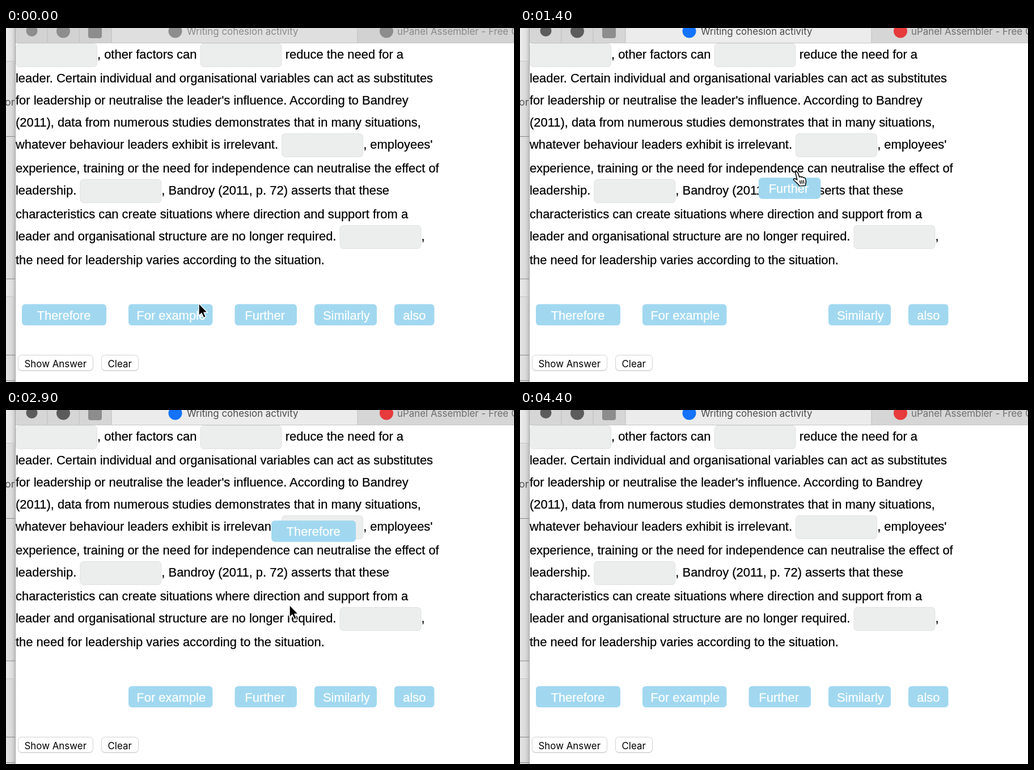
Recreate the animation shown at these times as an HTML page. Size 896 by 625 pixels, loop 5 s.

```html
<!DOCTYPE html>
<html lang="en">
<head>
<meta charset="utf-8">
<title>Writing cohesion activity</title>
<style>
  html, body { margin: 0; width: 100%; height: 100%; overflow: hidden; background: #fff; }
  svg { display: block; width: 896px; height: 625px; }
  text { white-space: pre; }
  .words { font: 21.93px "Liberation Sans", Arial, sans-serif; stroke: #000; stroke-width: .25px; }
  .chip .words { fill: #fff; stroke: #fff; }
  .chip rect { fill: #a1d8f0; }
  .slot { fill: #eceeed; stroke: #e0e2e1; }
  .ui { font: 16.9px Inter, sans-serif; }
  .bar { fill: #d2d2d2; }
  .tab { fill: #dfdfdf; }
  .title, .other { fill: #8a8a8a; }
  .icon { fill: #8d8d8d; }
  .active .bar { fill: #d6d6d6; }
  .active .tab { fill: #ececec; }
  .active .title { fill: #4b4b4b; }
  .active .other { fill: #707070; }
  .active .blue { fill: #1473fa; }
  .active .red { fill: #e63a3c; }
  .active .dark { fill: #5c5c5c; }
</style>
</head>
<body>
<svg viewBox="0 0 896 625" xmlns="http://www.w3.org/2000/svg">
  <defs>
    <linearGradient id="shade">
      <stop offset="0" stop-opacity=".02"/>
      <stop offset=".6" stop-opacity=".07"/>
      <stop offset="1" stop-opacity=".2"/>
    </linearGradient>
  </defs>
  <rect width="896" height="625" fill="#fff"/>

  <g id="page"></g>
  <g id="chips"></g>

  <g id="tabs">
    <rect class="bar" x="17" width="879" height="27"/>
    <rect class="tab" x="186" width="434" height="27"/>
    <path d="M73 0V26M129 0V26M186 0V26M620 0V26" stroke="#bdbdbd"/>
    <path d="M17 26.5H896" stroke="#c6c6c6"/>
    <circle class="icon dark" cx="45.5" cy="5" r="10"/>
    <circle class="icon dark" cx="101" cy="5.5" r="12"/>
    <rect class="icon" x="145" y="-6" width="24" height="24" rx="4"/>
    <circle class="icon blue" cx="298.5" cy="5.5" r="12"/>
    <circle class="icon red" cx="671" cy="5.5" r="12"/>
    <text class="ui title" x="319" y="12">Writing cohesion activity</text>
    <text class="ui other" x="690" y="12">uPanel Assembler - Free Code</text>
  </g>

  <g id="edge">
    <rect width="17" height="625" fill="#e9e9e9"/>
    <rect width="17" height="58" fill="#f2f2f2"/>
    <rect y="443" width="17" height="31" fill="#efefef"/>
    <text class="ui" x="-2" y="137" style="font-size:18px" fill="#5a5a5a">or</text>
    <rect width="17" height="625" fill="url(#shade)"/>
    <path d="M0 58.5H17M0 474.5H17" stroke="#c4c4c4"/>
    <path d="M0 191.5H17M0 443H17M0 577.5H17M0 622.5H17" stroke="#858585"/>
    <path d="M16.5 0V625" stroke="#a5a5a5"/>
  </g>

  <g id="arrow">
    <path d="M0 0V22L5 17.6L8.6 25.6L12.4 24L9 16.2H15.5Z" stroke="#fff" stroke-width="1.4" stroke-linejoin="round"/>
  </g>
  <g id="hand" stroke="#000" stroke-width="1.5" stroke-linecap="round" stroke-linejoin="round">
    <path fill="#fff" d="M5 3C4 .2 8-.3 9 2L12 10C13 8.5 15 8.8 15.5 10.5C16.5 9.2 18.5 9.5 19 11.3C20 10.4 22 11 22.5 13L23.5 17C24 20 22.5 21.5 22.5 25L12 26C11 23 6 20 2 15.5C.5 13.5 3 12 5 13.3L8 15Z"/>
    <path fill="none" d="M12.8 16.5L13.8 21.5M16 16.2L16.8 21.2M19.2 16L19.8 21"/>
  </g>
</svg>

<script>
const LOOP = 5000, STEP = 100, LAST = 4400;
const RETURN = 300, HOME_Y = 487.5;
const $ = id => document.getElementById(id);

function add(parent, tag, attrs, label) {
  const el = document.createElementNS("http://www.w3.org/2000/svg", tag);
  for (const k in attrs) el.setAttribute(k, attrs[k]);
  if (label) el.textContent = label;
  return parent.appendChild(el);
}

// Each underscore is a gap to fill; a line with gaps is a little taller.
const passage = `_, other factors can _ reduce the need for a
leader. Certain individual and organisational variables can act as substitutes
for leadership or neutralise the leader's influence. According to Bandrey
(2011), data from numerous studies demonstrates that in many situations,
whatever behaviour leaders exhibit is irrelevant. _, employees'
experience, training or the need for independence can neutralise the effect of
leadership. _, Bandroy (2011, p. 72) asserts that these
characteristics can create situations where direction and support from a
leader and organisational structure are no longer required. _,
the need for leadership varies according to the situation.`;

const page = $("page"), slots = [];
const pen = document.createElement("canvas").getContext("2d");
pen.font = '21.93px "Liberation Sans", Arial, sans-serif';

let baseline = 53.5;
for (const line of passage.split("\n")) {
  let x = 17;
  line.split("_").forEach((part, i) => {
    if (i) {
      const y = baseline - 26.5;
      slots.push([x, y]);
      add(page, "rect", { class: "slot", x: x + .5, y: y + .5, width: 143, height: 41, rx: 6 });
      x += 144;
    }
    if (part) add(page, "text", { class: "words", x, y: baseline }, part);
    x += pen.measureText(part).width;
  });
  baseline += line.includes("_") ? 42 : 39;
}

function button(x, width, label) {
  const box = { x, y: 578.5, width, height: 27, rx: 6, fill: "#c8c8c8" };
  add(page, "rect", box);
  add(page, "rect", { ...box, y: 577.5, fill: "#fff", stroke: "#d2d2d2" });
  add(page, "text", { class: "ui", x: x + 11, y: 598.5 }, label);
}
button(21.5, 132, "Show Answer");
button(168.5, 65, "Clear");

// A drag bends from home past "via" to "to"; "grip" is the hand's place on the chip.
const chips = [
  { label: "Therefore", x: 28, w: 149, pad: 26.5, slot: 4,
    drag: { pick: 2200, drop: 2860, via: [258, 335], to: [488, 182], grip: [62, 12] } },
  { label: "For example", x: 216, w: 148.5, pad: 14.3, slot: 2,
    drag: { pick: 400, drop: 900, via: [156, 373], to: [97, 258], grip: [32, 5] } },
  { label: "Further", x: 403.5, w: 109.5, pad: 17.8, slot: 3,
    drag: { pick: 1200, drop: 1600, via: [380, 184], to: [520, 201], grip: [60, -11] } },
  { label: "Similarly", x: 544, w: 110, pad: 15, slot: 0 },
  { label: "also", x: 685, w: 70.5, pad: 15.2, slot: 1 }
];

const swing = v => .5 - Math.cos(Math.PI * Math.min(1, Math.max(0, v))) / 2;
const mix = (a, b, p) => a.map((v, i) => v + (b[i] - v) * p);
const plus = (a, b) => a.map((v, i) => v + b[i]);
const place = (el, [x, y]) => el.setAttribute("transform", `translate(${x} ${y})`);

// Pointer rests as [time, point]; picks and drops are added from the drags.
const stops = [
  [0, [340, 486]], [2000, [273, 512]], [2900, [500, 344]],
  [3200, [95, 594]], [3400, [95, 594]],
  [3700, [198, 597]], [3900, [198, 597]], [4200, [230, 632]]
];

for (const c of chips) {
  c.home = [c.x, HOME_Y];
  c.el = add($("chips"), "g", { class: "chip" });
  add(c.el, "rect", { width: c.w, height: 37.5, rx: 6 });
  add(c.el, "text", { class: "words", x: c.pad, y: 27 }, c.label);
  if (c.drag) {
    const { pick, drop, to, grip } = c.drag;
    stops.push([pick, plus(c.home, grip)], [drop, plus(to, grip)]);
  }
}
stops.sort((a, b) => a[0] - b[0]);

function dragged({ home, drag }, t) {
  if (!drag) return home;
  const { pick, drop, via, to } = drag;
  if (t >= drop) return mix(to, home, swing((t - drop) / RETURN));
  const p = swing((t - pick) / (drop - pick));
  return mix(mix(home, via, p), mix(via, to, p), p);
}

function pointer(t) {
  const held = chips.find(({ drag }) => drag && t >= drag.pick && t < drag.drop);
  if (held) return plus(dragged(held, t), held.drag.grip);
  const i = stops.findIndex(s => s[0] > t);
  if (i < 0) return stops[stops.length - 1][1];
  const [t0, a] = stops[i - 1], [t1, b] = stops[i];
  return mix(a, b, swing((t - t0) / (t1 - t0)));
}

function draw(t) {
  $("tabs").setAttribute("class", t >= 200 ? "active" : "");

  const solved = swing((t - 3279) / RETURN) - swing((t - 3850) / RETURN);
  for (const c of chips) place(c.el, mix(dragged(c, t), slots[c.slot], solved));

  const grab = t >= 200 && t < 2900;
  $("hand").style.display = grab ? "" : "none";
  $("arrow").style.display = grab || t >= 4200 ? "none" : "";
  place(grab ? $("hand") : $("arrow"), pointer(t));
}

const start = performance.now();
function tick() {
  const t = (performance.now() - start) % LOOP;
  draw(Math.min(LAST, Math.floor(t / STEP) * STEP));
  requestAnimationFrame(tick);
}
tick();
</script>
</body>
</html>
```
